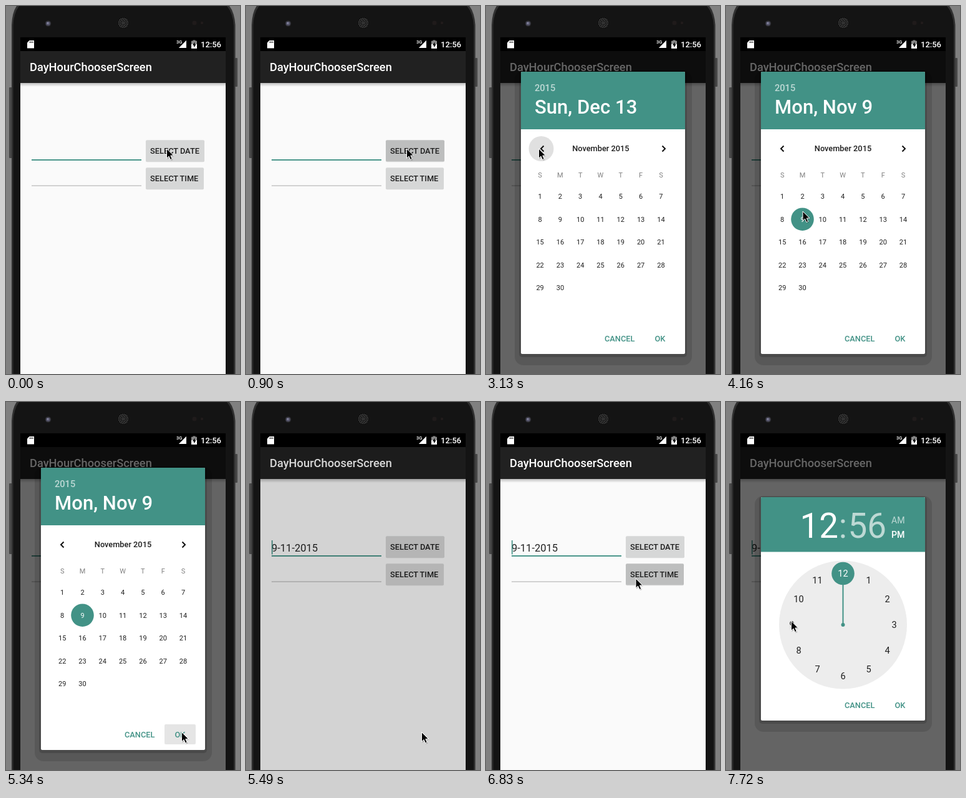
Write an HTML page that moves like this. It is 375 px wide and 588 px high and loops after 8 s.

```html
<!DOCTYPE html>
<html lang="en">
<head>
<meta charset="utf-8">
<title>Date and time picker</title>
<style>
  html, body { margin: 0; width: 100%; height: 100%; overflow: hidden; background: #808080; }
  svg { display: block; }
  text { font-family: Roboto, sans-serif; white-space: pre; }
  .m { font-weight: 500; }
  .c { text-anchor: middle; }
</style>
</head>
<body>
<svg id="stage" width="375" height="588" viewBox="0 0 375 588"></svg>
<script>
const TEAL = '#429286', INK = '#1f1f1f';
const LOOP = 8000, LEAD = 290, TICK = 148.4;

const rect = (x, y, w, h, fill, more = '') =>
  `<rect x="${x}" y="${y}" width="${w}" height="${h}" fill="${fill}" ${more}/>`;
const disc = (x, y, r, fill, more = '') =>
  `<circle cx="${x}" cy="${y}" r="${r}" fill="${fill}" ${more}/>`;
const text = (s, x, y, size, fill, cls = '', more = '') =>
  `<text x="${x}" y="${y}" font-size="${size}" fill="${fill}" class="${cls}" ${more}>${s}</text>`;

function speaker() {
  let s = disc(188, 27, 8.5, '#0c0c0c') + disc(188, 27, 0.8, '#777');
  for (let ring = 1; ring <= 3; ring++)
    for (let i = 0; i < ring * 6; i++) {
      const a = i * Math.PI / 3 / ring;
      s += disc(188 + ring * 2.4 * Math.cos(a), 27 + ring * 2.4 * Math.sin(a), 0.75, '#777');
    }
  return s;
}

function phone() {
  return rect(0, 0, 375, 588, '#808080') +
    rect(5, 130, 5, 113, '#484848', 'rx="1"') +
    rect(367, 83, 4, 46, '#484848', 'rx="1"') +
    '<path d="M17 0Q10 10 9 30V588H367.5V30Q366 10 358 0Z" fill="#303030"/>' +
    '<path d="M21 0Q12 12 11.5 32V588H365V32Q364 12 354 0Z" fill="#141414"/>' +
    disc(67.5, 28, 4.8, '#2c2c30') + disc(67.5, 28, 3.3, '#55556a') + disc(67, 27.5, 1.4, '#8a8aa5') +
    speaker() + disc(302, 27, 3.5, '#1f1b1b') + disc(314, 27, 2.2, '#211c1c');
}

function statusBar() {
  return rect(23, 50, 329, 22, '#000') +
    '<path d="M37.5 55H45V67.5H34V58.5Z" fill="#fff"/>' +
    '<path d="M38.5 56.5v2.5M40.7 56.5v2.5M42.9 56.5v2.5" stroke="#000"/>' +
    text('3G', 273, 60, 7.5, '#fff', 'm') +
    '<path d="M289 55V67H277Z" fill="#777"/><path d="M289 55V67H277L284 60Z" fill="#fff"/>' +
    '<path d="M299.5 54.5h4v1.3h2.5V61H297V55.8h2.5Z" fill="#888"/>' +
    rect(297, 61, 9, 7, '#fff') +
    '<path d="M302.5 57.5L299 62.7H301.2V66.5L304.5 61.2H302.5Z" fill="#000"/>' +
    text('12:56', 312, 66, 13, '#fff', 'm');
}

const button = (id, y, w, label) =>
  rect(224, y + 1, w, 34, '#000', 'rx="2" opacity=".14"') +
  rect(224, y, w, 34, '#d6d7d7', `rx="2" id="${id}"`) +
  text(label, 231, y + 21.7, 12.8, INK, 'm');

function app() {
  return rect(23, 72, 329, 516, '#fafafa') +
    rect(23, 123, 329, 6, 'url(#under)') + rect(23, 72, 329, 51, '#212121') +
    text('DayHourChooserScreen', 38, 104, 18.3, '#fff', 'm') +
    text('9-11-2015', 41, 239, 16.5, '#222', '', 'id="value"') +
    rect(41, 221, 1.6, 22.5, TEAL, 'id="caret"') +
    rect(41, 245, 176, 1.9, TEAL) + rect(41, 286.5, 176, 1.3, '#bdbdbd') +
    button('dateBtn', 214.3, 94, 'SELECT DATE') + button('timeBtn', 258.3, 93, 'SELECT TIME');
}

function dialog(y, h, head, body) {
  return rect(46, y - 2, 284, h + 20, '#000', 'rx="14" opacity=".12"') +
    rect(53, y - 1, 269, h + 6, '#000', 'rx="5" opacity=".16"') +
    rect(56, y, 263, h, '#fff', 'rx="2"') +
    `<path d="M56 ${y + head}V${y + 2}q0-2 2-2H317q2 0 2 2V${y + head}Z" fill="${TEAL}"/>` + body +
    text('CANCEL', 190, y + h - 20.5, 12.8, TEAL, 'm') +
    text('OK', 270.5, y + h - 20.5, 12.8, TEAL, 'm');
}

function month(title, first, days, picked) {
  const col = i => 90.2 + i * 32.3;
  let s = text(title, 187.5, 232.4, 12.8, INK, 'm c');
  [...'SMTWTFS'].forEach((d, i) => s += text(d, col(i), 274, 11, '#808080', 'c'));
  for (let d = 1; d <= days; d++) {
    const i = first + d - 1, x = col(i % 7), y = 304.2 + Math.floor(i / 7) * 36.5;
    if (d === picked) s += disc(x, y, 18.3, TEAL);
    s += text(d, x, y + 4, 11, d === picked ? '#fff' : INK, 'c');
  }
  return s;
}

const chevron = (x, dir) =>
  `<path d="M${x + 2.5 * dir} 223.5L${x - 2 * dir} 228L${x + 2.5 * dir} 232.5" fill="none" stroke="#111" stroke-width="2"/>`;

const datePicker = () => dialog(105, 451, 92,
  text('2015', 78, 135.5, 14.6, '#fff', 'm', 'opacity=".65"') +
  text('', 78, 172, 31.1, '#fff', 'm', 'id="day"') +
  disc(88.5, 228, 20, '#000', 'id="ripple"') +
  rect(254, 515, 50, 32, '#000', 'rx="2" id="okPress"') +
  '<g id="page"></g>' + chevron(90, 1) + chevron(285, -1));

function timePicker() {
  const cx = 187.5, cy = 356, r = 82;
  let s = text('12', 180, 217, 54.8, '#fff', '', 'text-anchor="end"') +
    text(':', cx, 217, 54.8, '#fff', 'c', 'opacity=".65"') +
    text('56', 195.5, 217, 54.8, '#fff', '', 'opacity=".65"') +
    text('AM', 265, 194, 14.2, '#fff', '', 'opacity=".65"') +
    text('PM', 265, 217, 14.2, '#fff', 'm') +
    disc(cx, cy, 102.5, '#ededed') + disc(cx, cy, 3, TEAL) +
    rect(cx - 1, cy - r, 2, r, TEAL) + disc(cx, cy - r, 18.3, TEAL);
  for (let h = 1; h <= 12; h++) {
    const a = h * Math.PI / 6;
    s += text(h, cx + r * Math.sin(a), cy - r * Math.cos(a) + 5.2, 14.6, h === 12 ? '#fff' : INK, 'c');
  }
  return dialog(152, 357, 87.5, s);
}

document.getElementById('stage').innerHTML =
  `<defs><linearGradient id="under" x2="0" y2="1">
    <stop stop-opacity=".24"/><stop offset="1" stop-opacity="0"/></linearGradient></defs>` +
  phone() + app() + rect(23, 72, 329, 516, '#000', 'id="dim"') + statusBar() +
  `<g id="dateDlg">${datePicker()}</g><g id="timeDlg">${timePicker()}</g>` +
  `<g id="pointer">
    <path d="M1 2V17L4.5 14 7 19 10 18 7.5 12.5H12Z" opacity=".22"/>
    <path d="M0 0V15.3L3.5 12 6 17.6 8.7 16.4 6.3 11H11Z" stroke="#fff"/></g>`;

const el = id => document.getElementById(id);
const set = (id, name, v) => el(id).setAttribute(name, v);

// Steps: [tick, value], held until the next entry.
const STEPS = {
  caret: [[-2, 0], [0, 1], [3, 0], [35, 1], [37, 0], [40, 1]],
  value: [[-2, 0], [35, 1]],
  dim: [[-2, 0], [5, .4], [6, .6], [35, .155], [36, 0], [46, .4], [47, .6]],
  dateDlg: [[-2, 0], [5, .7], [6, 1], [35, 0]],
  timeDlg: [[-2, 0], [46, .7], [47, 1]],
  ripple: [[-2, 0], [19, .12], [20, .08], [21, .03], [22, 0]],
  okPress: [[-2, 0], [34, .1], [35, 0]]
};
const PRESS = {
  dateBtn: [[-2, 0], [3, 1], [6, 0]],
  timeBtn: [[-2, 0], [44, 1], [47, 0]]
};
// Pointer stops: [tick, x, y], with even speed between them.
const PATH = [
  [8, 257.5, 228], [14, 57, 229], [16, 84.5, 228], [20, 84.5, 228], [23, 123, 328],
  [27, 123, 328], [29, 291, 510], [30, 291, 510], [32, 281.5, 527.5], [36, 281.5, 527.5],
  [41, 240, 282], [45, 240, 282], [50, 104.5, 350]
];
const MONTHS = [
  month('December 2015', 2, 31, 13),
  month('November 2015', 0, 30, 0),
  month('November 2015', 0, 30, 9)
];

const held = (list, k) => list.filter(s => s[0] <= k).pop()[1];

function pointerAt(k) {
  const i = PATH.findIndex(p => p[0] >= k);
  if (i <= 0) return PATH[i === 0 ? 0 : PATH.length - 1].slice(1);
  const [a, x0, y0] = PATH[i - 1], [b, x1, y1] = PATH[i];
  const u = (k - a) / (b - a);
  return [x0 + (x1 - x0) * u, y0 + (y1 - y0) * u];
}

let last = null, shown = -1;
function draw(k) {
  for (const id in STEPS) set(id, 'opacity', held(STEPS[id], k));
  for (const id in PRESS) set(id, 'fill', held(PRESS[id], k) ? '#bdbebe' : '#d6d7d7');
  const m = k < 19 ? 0 : k < 26 ? 1 : 2;
  if (m !== shown) el('page').innerHTML = MONTHS[shown = m];
  set('page', 'transform', `translate(${k === 19 ? -3.6 : 0} 0)`);
  el('day').textContent = k < 26 ? 'Sun, Dec 13' : 'Mon, Nov 9';
  set('pointer', 'transform', `translate(${pointerAt(k)})`);
}

function frame() {
  const k = Math.floor((performance.now() % LOOP - LEAD) / TICK);
  if (k !== last) draw(last = k);
  requestAnimationFrame(frame);
}
frame();
</script>
</body>
</html>
```
